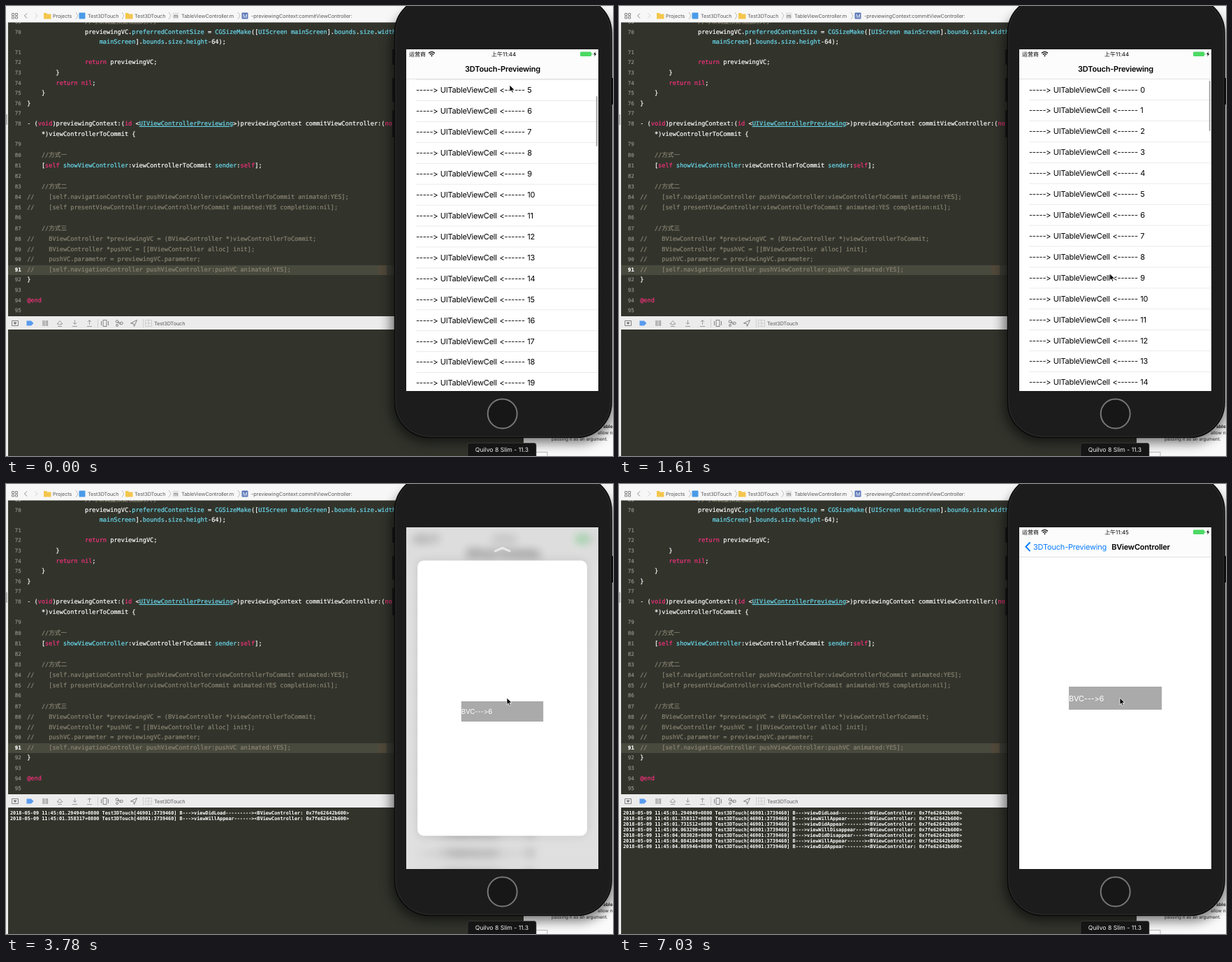
Recreate the animation shown at these times as an HTML page. Size 869 by 644 pixels, loop 8000 ms.

```html
<!DOCTYPE html>
<html lang="zh-CN">
<head>
<meta charset="utf-8">
<style>
html, body { margin: 0; width: 100%; height: 100%; overflow: hidden; background: #ececec; }
#stage { position: absolute; left: 0; top: 0; width: 869px; height: 644px; overflow: hidden; text-rendering: geometricPrecision; }
#dark { position: absolute; left: 2.5px; top: 0; width: 738px; height: 644px; background: #32342c; }
pre { position: absolute; margin: 0; font-family: "DejaVu Sans Mono", "Noto Sans CJK SC", monospace; color: #fff; }
#code { left: 0; top: 14.6px; width: 600px; height: 430px; overflow: hidden; font-size: 8.6px; -webkit-text-stroke: .2px; }
#code div { position: relative; height: 14.6px; line-height: 14.6px; padding-left: 30.2px; }
#code div.cjk { height: 16.1px; line-height: 16.1px; }
#code u { position: absolute; left: 0; width: 21.7px; text-align: right; font-size: 7.4px; color: #8f9089; text-decoration: none; }
#code .current { background: linear-gradient(90deg, transparent 3px, #494a3e 3px 533px, #51493a 533px 545px, #3c3d34 545px); }
#code .current u { color: #fff; font-weight: bold; }
k { color: #f6307c; }
t { color: #6bdcf0; }
c { color: #8a8573; }
#console { left: 6px; top: 466.5px; font-size: 6.84px; line-height: 8.06px; font-weight: bold; }
svg { position: absolute; left: 0; top: 0; }
svg text { font-family: Inter, "Noto Sans CJK SC", sans-serif; font-variant-ligatures: none; font-feature-settings: "calt" 0; }
.bar text { font-size: 7.3px; letter-spacing: -.1px; fill: #5a5a5a; }
.ui text { font-size: 11px; letter-spacing: -.2px; }
.ui .small { font-size: 8px; letter-spacing: 0; }
.ui .title { font-weight: 600; text-anchor: middle; }
#app { transform-origin: 710.5px 306.5px; }
</style>
</head>
<body>
<div id="stage">
  <div id="dark"></div>
  <pre id="code"></pre>
  <pre id="console"></pre>
  <svg width="869" height="644" viewBox="0 0 869 644">
    <defs>
      <clipPath id="screen"><path d="M573 62h275v489h-275z"/></clipPath>
      <filter id="soft" x="-20%" y="-20%" width="140%" height="140%"><feGaussianBlur stdDeviation="8"/></filter>
    </defs>

    <g class="bar" fill="none" stroke="#6a6a6a" stroke-width=".8">
      <path d="M0 0H869V23.500H0z" fill="#f7f7f7" stroke="none"/>
      <path d="M0 444H741V463H0z" fill="#ececec" stroke="none"/>
      <path d="M0 155h2v15h-2z" fill="#b5b5b5" stroke="none"/>
      <path d="M8.500 10.500h3v3h-3zM13.500 10.500h3v3h-3zM8.500 15h3v3h-3zM13.500 15h3v3h-3z"/>
      <path d="M30 10.500l-3.500 3.500 3.500 3.500"/>
      <path d="M41.500 10.500l3.500 3.500-3.500 3.500" stroke="#c4c4c4"/>
      <g id="crumbs" stroke="none"></g>

      <path d="M8.500 450.500h9v7h-9z"/>
      <path d="M11 453h4l-2 2.500z" fill="#6a6a6a"/>
      <path d="M29.500 450.500h6.500l3.500 3.500-3.500 3.500h-6.500z" fill="#5a9bee" stroke="none"/>
      <path d="M53 450v8M55 450v8M57.500 450v8M59.500 450v8"/>
      <g stroke="#8a8a8a">
        <path d="M73 455l4-4.500 4 4.500h-2.500v1h-3v-1zM74 458.500h6"/>
        <path d="M98.500 449.500v6M96 453l2.500 2.500 2.500-2.500M95 458.500h7"/>
        <path d="M119.500 456v-6M117 452l2.500-2.500 2.500 2.500M116 458.500h7"/>
      </g>
      <path d="M131.500 448v12M196.500 448v12" stroke="#c8c8c8"/>
      <path d="M139 449.500h5v9h-5zM136.500 451v6M146.500 451v6"/>
      <path d="M160 452l4 1.500M160 453l4 3"/>
      <circle cx="159" cy="451.500" r="1.800"/><circle cx="165.500" cy="454" r="1.800"/><circle cx="159" cy="457" r="1.500"/>
      <path d="M178.500 454l9-4.500-4 9-.8-3.800z"/>
      <path d="M199.500 449.500h9v9h-9zM199.500 454h9M204 449.500v9" stroke="#c8c8c8"/>
      <text x="212" y="456.700" stroke="none">Test3DTouch</text>
    </g>

    <path d="M741 24H869V644H741z" fill="#fafafa"/>
    <rect x="550" y="2" width="322" height="624" rx="54" opacity=".5" filter="url(#soft)"/>
    <g font-size="6.500" fill="#222">
      <path d="M741 638.500h34M775 638v6" stroke="#b5b5b5"/>
      <text x="855" y="604" font-weight="bold">able</text>
      <text x="847" y="613">allow n</text>
      <text x="781" y="621.500">passing it as an argument.</text>
    </g>

    <path d="M553 62h5v22h-5zM553 103h5v34h-5zM553 149h5v39h-5zM865 103h4v38h-4z" fill="#101010"/>
    <rect x="556.500" y="-12" width="310.500" height="629.500" rx="50" fill="#1c1c1c" stroke="#0b0b0b" stroke-width="1.500"/>
    <rect x="558" y="-10.500" width="307.500" height="626.500" rx="48.500" fill="none" stroke="#303030" stroke-width=".8"/>
    <circle cx="710.700" cy="583.500" r="21" fill="#171717" stroke="#777" stroke-width="2"/>
    <rect x="661" y="625.500" width="98" height="22" rx="3" fill="#151515" stroke="#444" stroke-width=".6"/>
    <text x="710" y="637.500" font-size="8.600" fill="#f2f2f2" text-anchor="middle">Quilvo 8 Slim - 11.3</text>

    <g class="ui" clip-path="url(#screen)">
      <g id="app">
        <path d="M540 20H880V600H540z" fill="#fff"/>
        <rect id="pressed" x="573" y="284" width="275" height="30" fill="#d8d8d8"/>
        <g id="rows"></g>
        <rect id="scroller" x="844.800" width="2" rx="1" fill="#a8a8a8"/>
        <path d="M540 20H880V104.500H540z" fill="#fcfcfc"/>
        <path d="M573 104.500h275" stroke="#d6d6d6" stroke-width=".7"/>
        <g class="status"></g>
        <text class="title" x="711" y="94">3DTouch-Previewing</text>
      </g>
      <path id="dim" d="M573 62h275v489h-275z"/>
      <path id="arrow" d="M-10.500 2.500L0 -2L10.500 2.500" fill="none" stroke="#fff" stroke-width="3" stroke-linecap="round" stroke-linejoin="round"/>
      <g id="card">
        <rect class="sheet" x="-137.500" width="275" fill="#000" opacity=".1" filter="url(#soft)"/>
        <rect class="sheet" x="-137.500" width="275" fill="#fff"/>
        <g id="label">
          <path d="M-66.500 0h133v33h-133z" fill="#aaa"/>
          <text x="-66.500" y="20.800" fill="#fff">BVC---&gt;6</text>
        </g>
      </g>
      <g id="pushedNav">
        <path d="M573 62h275v42.500h-275z" fill="#fcfcfc"/>
        <path d="M573 104.500h275" stroke="#d6d6d6" stroke-width=".7"/>
        <g class="status"></g>
        <path d="M588.500 83.500l-6 6.300 6 6.300" fill="none" stroke="#0a7cff" stroke-width="2"/>
        <text x="593" y="94" fill="#0a7cff">3DTouch-Previewing</text>
        <text class="title" x="747" y="94">BViewController</text>
      </g>
    </g>
    <path id="cursor" d="M0 0V9.800L2.200 7.700L3.800 11.300L5.400 10.600L3.900 7.100H7z" stroke="#fff" stroke-width=".8"/>
  </svg>
</div>

<script>
const $ = id => document.getElementById(id);
const all = name => document.querySelectorAll('.' + name);
const attrs = (el, map) => { for (const k in map) el.setAttribute(k, map[k]); };

// Editor: k = keyword, t = type or call, c = comment; "" continues a wrapped line.
const code = [
  [69, 16, '<c>//可以调整预览视图的大小</c>'],
  [70, 16, 'previewingVC.<t>preferredContentSize</t> = <t>CGSizeMake</t>([<t>UIScreen mainScreen</t>].<t>bounds</t>.<t>size</t>.<t>width</t>,'],
  ['', 20, '<t>mainScreen</t>].<t>bounds</t>.<t>size</t>.<t>height</t>-64);'],
  [71, 0, ''],
  [72, 16, '<k>return</k> previewingVC;'],
  [73, 8, '}'],
  [74, 8, '<k>return nil</k>;'],
  [75, 4, '}'],
  [76, 0, '}'],
  [77, 0, ''],
  [78, 0, '- (<k>void</k>)previewingContext:(<k>id</k> &lt;<t style="text-decoration:underline .5px">UIViewControllerPreviewing</t>&gt;)previewingContext commitViewController:(<k>no</k>'],
  ['', 4, '*)viewControllerToCommit {'],
  [79, 0, ''],
  [80, 4, '<c>//方式一</c>'],
  [81, 4, '[<k>self</k> <t>showViewController</t>:viewControllerToCommit <t>sender</t>:<k>self</k>];'],
  [82, 0, ''],
  [83, 4, '<c>//方式二</c>'],
  [84, 0, '<c>//    [self.navigationController pushViewController:viewControllerToCommit animated:YES];</c>'],
  [85, 0, '<c>//    [self presentViewController:viewControllerToCommit animated:YES completion:nil];</c>'],
  [86, 0, ''],
  [87, 4, '<c>//方式三</c>'],
  [88, 0, '<c>//    BViewController *previewingVC = (BViewController *)viewControllerToCommit;</c>'],
  [89, 0, '<c>//    BViewController *pushVC = [[BViewController alloc] init];</c>'],
  [90, 0, '<c>//    pushVC.parameter = previewingVC.parameter;</c>'],
  [91, 0, '<c>//    [self.navigationController pushViewController:pushVC animated:YES];</c>'],
  [92, 0, '}'],
  [93, 0, ''],
  [94, 0, '<k>@end</k>'],
  [95, 0, '']
];
$('code').innerHTML = code.map(([number, indent, text]) => {
  const kind = number === 91 ? 'current' : /[\u4e00-\u9fff]/.test(text) ? 'cjk' : '';
  return `<div class="${kind}"><u>${number}</u>${' '.repeat(indent)}${text}</div>`;
}).join('');

const folder = x => `<path d="M${x - 5} 10h4l1 1.500h5.500v7h-10.500z" fill="#f3c64c"/>`;
const block = (x, color) => `<rect x="${x - 4.5}" y="9.500" width="9" height="9" rx="1" fill="${color}"/>`;
const crumb = (x, text, icon) => `${icon}<text x="${x}" y="16.700">${text}</text>`;
$('crumbs').innerHTML =
  crumb(67, 'Projects', folder(59)) +
  crumb(117, 'Test3DTouch', block(109, '#4a9be8')) +
  crumb(184, 'Test3DTouch', folder(176)) +
  crumb(251, 'TableViewController.m', block(243, '#e4e4e4') + '<text x="240" y="17">m</text>') +
  crumb(351, '-previewingContext:commitViewController:', block(342, '#5b77b8') + '<text x="339" y="16.700" style="fill:#fff">M</text>') +
  [101, 167, 234, 333].map(x => `<path d="M${x - 1} 9l3 5-3 5" fill="none" stroke="#b0b0b0"/>`).join('');

// Phone
all('status').forEach(el => el.innerHTML = `
  <text class="small" x="577" y="71.700">运营商</text>
  <path d="M605 67.500q4.500-3.700 9 0M606.800 69.500q2.700-2.200 5.400 0" fill="none" stroke="#000" stroke-width="1.300"/>
  <circle cx="609.500" cy="71.300" r="1"/>
  <text class="small clock" x="712.500" y="71.700" text-anchor="middle"></text>
  <rect x="822" y="65.500" width="16" height="6.500" rx="1.500" fill="#4cd964"/>
  <path d="M839 67.500v2.500" stroke="#4cd964"/>
  <path d="M844 65l-3 4.200h2l-.8 3.300 3-4.300h-2z"/>`);

const pitch = 29.92;
$('rows').innerHTML = Array.from({ length: 21 }, (_, i) => {
  const y = 119.5 + i * pitch;
  return `<text y="${y + 4}"><tspan x="587">-----&gt;</tspan><tspan x="621.700">UITableViewCell</tspan><tspan x="706.500">&lt;------</tspan><tspan x="746.300">${i}</tspan></text>
    <path d="M587 ${y + 15}h261" stroke="#e2e2e2" stroke-width=".7"/>`;
}).join('');

const logs = [
  [3600, '01.294949', 'viewDidLoad'],
  [3600, '01.358317', 'viewWillAppear'],
  [4050, '01.731512', 'viewDidAppear'],
  [6330, '04.063290', 'viewWillDisappear'],
  [6330, '04.083028', 'viewDidDisappear'],
  [6330, '04.084104', 'viewWillAppear'],
  [6330, '04.085946', 'viewDidAppear']
];
const logLine = ([, second, method]) =>
  `2018-05-09 11:45:${second}+0800 Test3DTouch[46901:3739460] B--->${method.padEnd(20, '-')}><BViewController: 0x7fe62642b600>`;

const LOOP = 8000;
const ticks = [0, 210, 510, 730, 950, 1190, 1400, 1610, 1810, 1990, 2170, 2700, 2880, 3240, 3600, 3780,
  4050, 4260, 4480, 4690, 4910, 5300, 5660, 5880, 6110, 6330, 6560, 6860, 7030];
const tracks = {
  cursorX: [[0, 721], [510, 710], [950, 701], [1810, 703], [2170, 717]],
  cursorY: [[0, 113], [210, 141], [510, 240], [730, 330], [950, 383], [1610, 383], [1990, 330], [2170, 309], [2700, 308], [2880, 306]],
  scroll: [[0, 148.6], [210, 121], [510, 22], [730, -30], [950, -48], [1190, -16], [1400, -1], [1610, 0]],
  scroller: [[1610, 1], [2170, 0]],
  peek: [[3240, 0], [3600, .5], [3780, 1]],
  dim: [[3240, 0], [3600, .06], [3780, .12], [4910, .1]],
  scale: [[3240, .12], [3600, .4], [3780, .883], [4050, .918], [4480, .9], [4910, .891], [5300, .891], [6110, .925], [6330, .965], [6560, .995], [6860, 1]],
  arrowY: [[3600, 110], [3780, 93.5], [4050, 91], [4910, 96.5], [5300, 96.5], [6110, 84]],
  arrow: [[3600, 0], [3780, .6], [4050, 1], [6110, 1], [6560, 0]],
  commit: [[6110, 0], [6560, 1]],
  pushed: [[6330, 0], [6560, .5], [6860, .9], [7030, 1]]
};

function valueAt(keys, t) {
  const next = keys.findIndex(key => key[0] > t);
  if (next === 0) return keys[0][1];
  if (next < 0) return keys[keys.length - 1][1];
  const [t0, a] = keys[next - 1], [t1, b] = keys[next];
  return a + (b - a) * (t - t0) / (t1 - t0);
}

function draw(t) {
  const v = {};
  for (const name in tracks) v[name] = valueAt(tracks[name], t);

  attrs($('cursor'), { transform: `translate(${v.cursorX} ${v.cursorY})` });
  attrs($('rows'), { transform: `translate(0 ${-v.scroll})` });
  attrs($('scroller'), { y: 107 + Math.max(0, v.scroll) * .148, height: 72 + Math.min(0, v.scroll), opacity: v.scroller });
  attrs($('pressed'), { opacity: t >= 3240 ? 1 - v.peek : 0 });
  all('clock').forEach(el => el.textContent = t < 2170 ? '上午11:44' : '上午11:45');

  $('app').style.filter = v.peek ? `blur(${v.peek * 7}px)` : 'none';
  $('app').style.transform = `scale(${1 - v.peek * .043})`;
  attrs($('dim'), { opacity: v.dim });
  attrs($('arrow'), { transform: `translate(710.700 ${v.arrowY})`, opacity: v.arrow });

  const height = 446 + 43 * v.commit;
  attrs($('card'), { transform: `translate(710.500 306.500) scale(${v.scale})`, opacity: v.peek });
  all('sheet').forEach(el => attrs(el, { y: -height / 2, height, rx: 10 * (1 - v.commit) }));
  attrs($('label'), { transform: `translate(0 ${228 - height / 2})` });
  attrs($('pushedNav'), { opacity: v.pushed });

  $('console').textContent = logs.filter(log => t >= log[0]).map(logLine).join('\n');
}

let shown = -1;
function loop() {
  const t = performance.now() % LOOP;
  const tick = ticks.filter(time => time <= t).pop();
  if (tick !== shown) draw(shown = tick);
  requestAnimationFrame(loop);
}
loop();
</script>
</body>
</html>
```
